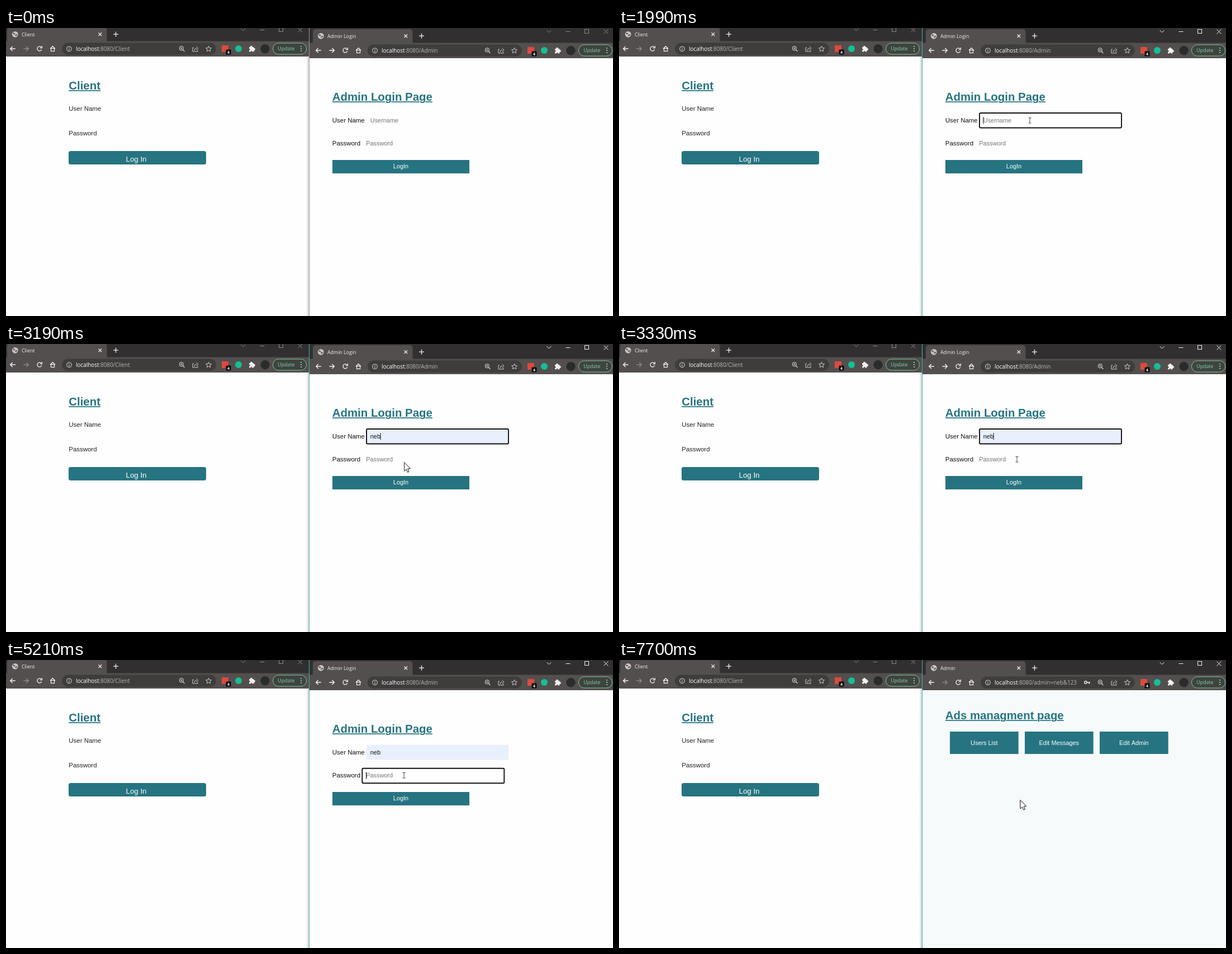
These frames come from a looping animation (1086 px wide and 515 px high, 8 s). An HTML page with a canvas:

```html
<!DOCTYPE html>
<html lang="en">
<head>
<meta charset="utf-8">
<title>Login demo</title>
<style>
html, body { margin: 0; width: 100%; height: 100%; overflow: hidden; background: #fefefe; }
canvas { display: block; }
</style>
</head>
<body>
<canvas id="stage" width="1086" height="515"></canvas>
<script>
const g = document.getElementById('stage').getContext('2d');
const LOOP = 8000, BLINK = 530, CLICK = 140, KEY_GAP = 260;
const ARIAL = '"Liberation Sans", Arial, sans-serif';
const UI = '"Open Sans", "Noto Sans", sans-serif';
const TEAL = '#267481', PAGE = '#fefefe', BAR = '#534f4e', TITLE = '#312f30', PILL = '#3f3c3c';
const ICON = '#f4f3f3', SOFT = '#d2d0cf';
const NAMES = ['ovan', 'neb', 'ovan1', '1'];
const USER = NAMES[1], ROW = 26.8, ROW_TOP = 184.3;

// Moments of the story, in ms
const ENTER = 720, ACTIVE = 1790, FOCUS_USER = 1930, MENU = 2800, PICK = 3140, FOCUS_PASS = 3470;
const FIRST_KEY = 4140, ERASE = 5210, RETYPE = 5340, SUBMIT = 7090, LOADING = 7230, LOADED = 7500, SHOWN = 7560;
const CLICKS = [1720, 2730, PICK - CLICK, 3400, SUBMIT];

// Pointer moves: end point, start and end time
const MOVES = [
  { x: 583, y: 330, from: ENTER, to: 1080 },
  { x: 760, y: 211, from: 1080, to: 1450 },
  { x: 735, y: 165, from: 1450, to: 1660 },
  { x: 713, y: 214, from: 2730, to: 3010 },
  { x: 712, y: 206, from: PICK, to: 3270 },
  { x: 720, y: 261, from: 6400, to: 6670 },
  { x: 718, y: 250, from: 6750, to: 6820 }
];
const within = (t, a, b) => t >= a && t < b;
const clamp = (v, a, b) => Math.min(b, Math.max(a, v));

function rect(x, y, w, h, fill, r = 0) {
  g.fillStyle = fill;
  g.beginPath();
  g.roundRect(x, y, w, h, r);
  g.fill();
}

function disc(x, y, r, fill) {
  g.fillStyle = fill;
  g.beginPath();
  g.arc(x, y, r, 0, 7);
  g.fill();
}

function ring(x, y, r, color, w = 1.2, from = 0, to = 2 * Math.PI) {
  g.strokeStyle = color;
  g.lineWidth = w;
  g.beginPath();
  g.arc(x, y, r, from, to);
  g.stroke();
}

function line(color, w, ...strokes) {
  g.strokeStyle = color;
  g.lineWidth = w;
  g.beginPath();
  for (const s of strokes)
    for (let i = 0; i < s.length; i += 2) i ? g.lineTo(s[i], s[i + 1]) : g.moveTo(s[i], s[i + 1]);
  g.stroke();
}

function box(x, y, w, h, color, lw = 1) {
  g.strokeStyle = color;
  g.lineWidth = lw;
  g.strokeRect(x, y, w, h);
}

const cross = (x, y, r, color, w) =>
  line(color, w, [x - r, y - r, x + r, y + r], [x + r, y - r, x - r, y + r]);

const plus = (x, y, r, color, w) =>
  line(color, w, [x - r, y, x + r, y], [x, y - r, x, y + r]);

function text(s, x, y, size, color, font = ARIAL, weight = 400, align = 'left') {
  g.font = `${weight} ${size}px ${font}`;
  g.textAlign = align;
  g.fillStyle = color;
  g.fillText(s, x, y);
  return g.measureText(s).width;
}

// Underlined heading whose line skips the descenders
function heading(s, x, y, bg) {
  const w = text(s, x, y, 20.4, TEAL, ARIAL, 700);
  rect(x, y + 1.5, w, 1.8, TEAL);
  g.strokeStyle = bg;
  g.lineWidth = 2;
  g.strokeText(s, x, y);
  text(s, x, y, 20.4, TEAL, ARIAL, 700);
}

function globe(x, y) {
  disc(x, y, 5.4, '#c9c7c7');
  g.fillStyle = '#625e5d';
  for (const side of [-1, 1]) {
    g.beginPath();
    g.ellipse(x + 2 * side, y + 1.4 * side, 2.3, 1.3, -.5 * side, 0, 7);
    g.fill();
  }
}

function star(x, y, r) {
  const p = [];
  for (let i = 0; i <= 10; i++) {
    const a = i * Math.PI / 5 - Math.PI / 2, k = i % 2 ? r * .45 : r;
    p.push(x + k * Math.cos(a), y + k * Math.sin(a));
  }
  line(SOFT, 1, p);
}

function arrow(x, y, dir, color) {
  const tip = x + 4.5 * dir, back = tip - 4 * dir;
  line(color, 1.4, [x - 4.5 * dir, y, tip, y], [back, y - 4, tip, y, back, y + 4]);
}

function navIcons(canForward) {
  arrow(12.2, 37, -1, ICON);
  arrow(35.8, 37, 1, canForward ? ICON : '#8d8988');
  ring(60, 37, 4, ICON, 1.4, .4, 5.5);
  line(ICON, 1.4, [64.3, 32, 64.3, 35.6, 60.8, 35.6]);
  line(ICON, 1.3, [79, 37, 83.5, 32.7, 88, 37]);
  box(80.5, 36.5, 6, 5, ICON, 1.2);
}

function pillIcons() {
  ring(113, 37.3, 4.3, SOFT, 1.1);
  line(SOFT, 1.2, [113, 36.8, 113, 39.7], [113, 34.8, 113, 35.9]);
  ring(313.8, 36.2, 3.4, SOFT, 1.1);
  line(SOFT, 1.3, [316.3, 38.7, 319.5, 42]);
  plus(313.8, 36.2, 1.8, SOFT, 1);
  line(SOFT, 1, [336, 35, 334, 35, 334, 42, 343, 42, 343, 39.5], [340.5, 33, 344, 36.2, 340.5, 39.4]);
  ring(341, 40.2, 4, SOFT, 1, Math.PI, 1.5 * Math.PI);
  star(362.5, 37.5, 5.3);
}

function extensions() {
  rect(386, 31, 12, 12, '#dc4a3d', 1);
  rect(393.5, 38.5, 9, 9, '#0a0a0a', 1.5);
  text('4', 398, 45.8, 7, '#fff', UI, 700, 'center');
  disc(416, 37, 6, '#15bf94');
  rect(435, 34, 8.5, 8.5, ICON, 1);
  disc(439, 33.6, 1.9, ICON);
  disc(444, 38, 1.9, ICON);
  disc(435.3, 38.4, 1.4, BAR);
  disc(439.2, 42.4, 1.4, BAR);
  disc(463.6, 37.3, 8.2, '#2a2c2c');
  rect(477.5, 27, 60, 20, '#3e4440', 10);
  g.strokeStyle = '#7fc698';
  g.lineWidth = 1;
  g.stroke();
  text('Update', 486.3, 40.2, 8.8, '#8bd0a3', UI);
  for (let i = -1; i <= 1; i++) disc(528, 37 + 4 * i, 1.1, '#a5dcb8');
}

function browser(dx, dy, tab, path, active, canForward, spin) {
  g.save();
  g.translate(dx, dy);
  rect(dx ? -4 : 0, -dy, 543, 24 + dy, TITLE);
  rect(dx ? -4 : 0, 23.5, 543, 27.5, BAR);
  rect(2, -1, 178.5, 26, BAR, [5, 5, 0, 0]);
  if (spin >= 0) ring(16.3, 11, 4.8, '#c9c7c7', 1.4, spin, spin + 4);
  else globe(16.3, 11.3);
  text(tab, 28, 14.5, 8.8, '#f1f0f0', UI);
  cross(168.3, 11.2, 2.8, ICON, 1.3);
  plus(196.5, 11.2, 4.5, ICON, 1.3);

  const c = active ? '#f4f4f4' : '#8b898a';
  line(c, 1, [420.5, 1, 424.5, 5, 428.5, 1], [454.5, 3.5, 462.5, 3.5]);
  box(488.5, -.5, 7, 7, c);
  cross(526.5, 3.5, 4, c, 1);

  navIcons(canForward);
  rect(100, 26.5, 276, 21.5, PILL, 10.7);
  pillIcons();
  const w = text('localhost', 125, 41, 9.9, '#fff', UI);
  text(':8080/' + path, 125 + w, 41, 9.9, '#b8b5b4', UI);
  extensions();
  g.restore();
}

function keyIcon() {
  ring(835, 40, 2.2, '#e6e4e4', 1.6);
  line('#e6e4e4', 1.7, [837, 40, 843, 40], [841.2, 40, 841.2, 42.8]);
}

function clientPage() {
  rect(0, 51, 542, 464, PAGE);
  heading('Client', 112.3, 109.7, PAGE);
  text('User Name', 112.3, 148, 11.45, '#202020');
  text('Password', 112.3, 192, 11.45, '#202020');
  rect(112, 220, 246, 24, TEAL, 3.5);
  text('Log In', 214.5, 239, 13.3, '#fff');

  const shade = g.createLinearGradient(537, 0, 543, 0);
  shade.addColorStop(0, 'rgba(0,0,0,0)');
  shade.addColorStop(1, 'rgba(0,0,0,.22)');
  rect(537, 51, 6, 464, shade);
}

function field(x, y, focused, filled) {
  if (!filled && !focused) return;
  rect(x, y, 254, 26.5, filled ? '#e8effd' : '#fff', focused ? 2 : 0);
  if (!focused) return;
  g.strokeStyle = '#101014';
  g.lineWidth = 1.9;
  g.stroke();
}

function caret(x, y, idle) {
  if (idle % (2 * BLINK) < BLINK) rect(x, y, 1, 12.5, '#111');
}

function menu(row) {
  g.save();
  g.shadowColor = 'rgba(0,0,0,.45)';
  g.shadowBlur = 4;
  g.shadowOffsetY = 1;
  rect(645, 178.5, 254.5, 118.7, '#292a2d', 2);
  g.restore();
  if (row >= 0) rect(645, ROW_TOP + row * ROW, 254.5, ROW, '#3f4042');
  NAMES.forEach((s, i) => text(s, 654, 201 + i * ROW, 9, '#e8eaed', UI, 600));
}

// Password length and the time of the last key press
function typed(t) {
  if (t >= RETYPE) {
    const n = clamp(Math.floor((t - RETYPE) / KEY_GAP), 0, 2);
    return { dots: n + 1, last: RETYPE + n * KEY_GAP };
  }
  if (t >= ERASE) return { dots: 0, last: ERASE };
  if (t >= FIRST_KEY) return { dots: 1, last: FIRST_KEY };
  return { dots: 0, last: FOCUS_PASS };
}

function loginPage(t, p) {
  rect(543, 54, 543, 461, PAGE);
  heading('Admin Login Page', 583.8, 129.7, PAGE);
  text('User Name', 583.8, 169, 11.45, '#101010');
  text('Password', 583.8, 210.2, 11.45, '#101010');

  const open = within(t, MENU, PICK);
  const row = open ? Math.floor((p.y - ROW_TOP) / ROW) : -1;
  const user = t >= PICK ? USER : NAMES[row] || '';
  const inUser = within(t, FOCUS_USER, FOCUS_PASS);
  field(645, 152, inUser, user);
  text(user || 'Username', 651.8, 168.8, 10.9, user ? '#111' : '#757575');
  if (inUser) t < PICK ? caret(651.3, 159, t - FOCUS_USER) : caret(669.6, 159, t - PICK);

  const { dots, last } = typed(t);
  const inPass = within(t, FOCUS_PASS, SUBMIT);
  field(637.3, 193.7, inPass, false);
  text('•'.repeat(dots) || 'Password', 644.2, 210.3, 10.9, dots ? '#111' : '#757575');
  if (inPass) caret(644 + dots * 3.82, 200.5, t - last);

  rect(584, 236, 245, 24, TEAL);
  text('LogIn', 706.5, 251, 10.9, '#fff', ARIAL, 400, 'center');
  if (open) menu(row);
}

function adminPage() {
  const bg = '#f6fafb';
  rect(543, 54, 543, 461, bg);
  heading('Ads managment page', 583.8, 105.7, bg);
  ['Users List', 'Edit Messages', 'Edit Admin'].forEach((s, i) => {
    const x = 592 + i * 134;
    rect(x, 128, 122.7, 40, TEAL);
    text(s, x + 61.3, 151.7, 10.9, '#fff', ARIAL, 400, 'center');
  });
}

function pointerAt(t) {
  let x = 1006, y = 460;
  for (const m of MOVES) {
    const k = clamp((t - m.from) / (m.to - m.from), 0, 1), e = k * k * (3 - 2 * k);
    x += (m.x - x) * e;
    y += (m.y - y) * e;
  }
  return { x, y };
}

function pointer(t, { x, y }) {
  if (t < ENTER) return;
  if (CLICKS.some(c => within(t, c, c + CLICK))) disc(x, y - .5, 9, 'rgba(208,198,10,.78)');
  g.save();
  g.translate(x - .5, y);
  const overField = within(t, 1550, MENU) || within(t, 3200, 6430);
  if (overField) {
    line('#444', 1, [.5, -4, .5, 4.5]);
    for (const end of [-4.5, 5]) line('#444', 1, [-2, end, 3, end]);
  } else {
    g.fillStyle = '#fff';
    g.strokeStyle = '#303036';
    g.lineWidth = 1;
    g.stroke(head);
    g.fill(head);
    g.stroke(head);
  }
  g.restore();
}
const head = new Path2D('M.5 .5V16L4 12.7 6.5 18 8.8 17 6.5 11.8 11.2 11.5Z');

function draw(t) {
  const loaded = t >= LOADED, p = pointerAt(t);
  browser(0, 0, 'Client', 'Client', false, false, -1);
  clientPage();
  t >= SHOWN ? adminPage() : loginPage(t, p);

  const spin = within(t, LOADING, SHOWN) ? (t - LOADING) / 90 : -1;
  browser(547, 3, loaded ? 'Admin' : 'Admin Login', loaded ? `admin=${USER}&123` : 'Admin',
    t >= ACTIVE, !loaded, spin);
  if (typed(t).dots) keyIcon();
  rect(542, 0, 1, 515, t >= ACTIVE ? '#3fb3b8' : '#9a9a9a');
  pointer(t, p);
}

const start = performance.now();
function tick() {
  draw((performance.now() - start) % LOOP);
  requestAnimationFrame(tick);
}
tick();
</script>
</body>
</html>
```
